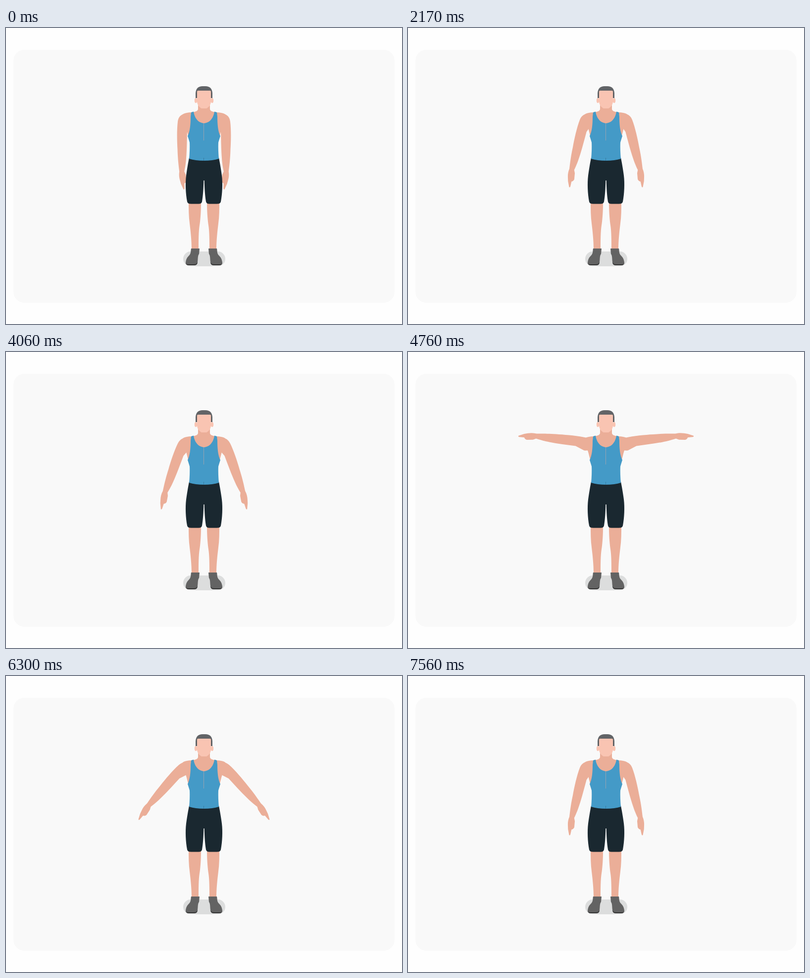
Animation, 800 px wide and 600 px high, one loop 7.63 s. Source, as an HTML page:

```html
<!DOCTYPE html>
<html lang="en">
<head>
<meta charset="utf-8">
<title>Arm raises</title>
<style>
  html, body { margin: 0; width: 100%; height: 100%; overflow: hidden; background: #fefefe; }
  svg { display: block; width: 800px; height: 600px; }
  .skin { fill: #ebae98; }
  .face { fill: #f9c4b2; }
  .hair { fill: #626467; }
  .top { fill: #449ac7; }
  .shorts { fill: #1a2830; }
  .shoe { fill: #636363; }
  .sole { fill: #333; }
</style>
</head>
<body>
<svg viewBox="0 0 800 600">
  <rect x="15" y="44" width="770" height="513" rx="22" fill="#f9f9f9"/>
  <rect x="358" y="453" width="85" height="30" rx="15" fill="#dcdddd"/>

  <!-- left half of the body, mirrored for the right -->
  <g id="half">
    <path id="arm" class="skin" d="M-14 2 C-16 18 -15.5 42 -14.5 58 C-14 78 -12 93 -10.8 103
      C-12 110 -11 116 -9.5 121 L-7.5 128 L-2.5 139 Q-.5 140 -.3 137 L-.5 127
      Q3.5 125 3.8 121 L2 109 L-.8 103 C1.5 92 2.5 84 3 76 C4.5 58 4.5 40 5 22
      L12 4 C12 -8 6 -14 0 -14 C-8 -13 -13 -7 -14 2 Z"/>
    <path class="skin" d="M401 164 H388 C388 169 381 170 374 171 C368 171 362 172 357 175
      L357 189 C364 197 365 208 368 218 L376 228 H401 Z"/>
    <path class="skin" d="M369 352 C369 366 369 382 371 396 C373 413 375 430 375 450 H389
      C389 430 389 413 391 400 C393 387 394 370 394 352 Z"/>
    <path class="sole" d="M363 475 Q363 481 369 481 H381 Q387 481 387 474 Z"/>
    <path class="shoe" d="M374 447 H391 L390 458 C387 462 388 468 387 474 Q386 479 379 479 H368
      Q363 479 363 475 C364 468 366 465 370 461 C374 457 373 452 374 447 Z"/>
    <path class="shorts" d="M370 263 H400.5 V309 H399.3 C399 325 398 340 396 352 Q395 356.5 389 356.5
      H374 Q367 356.5 366 352 C363 336 362 315 364 299 C366 284 368 273 370 263 Z"/>
    <path class="top" d="M374 171 L379 169.500 C381 184 390 193 400.500 193 V269 Q382 269 370 265
      C371 254 371.500 243 371 232 Q369 225 367 219 C372 209 373 194 373 180 Z"/>
  </g>
  <use href="#half" transform="translate(800) scale(-1 1)"/>

  <path class="skin" d="M388 155 H412 V168 H388 Z"/>
  <ellipse class="face" cx="383.500" cy="147" rx="2.700" ry="5"/>
  <ellipse class="face" cx="416.500" cy="147" rx="2.700" ry="5"/>
  <path class="hair" d="M383 142 V132 Q384 118 397 118 H403 Q416 118 417 132 V142 Z"/>
  <path class="face" d="M386 129 Q386 127 388 127 H412 Q414 127 414 129 V150
    C413 157 409 161 405 163 H395 C391 161 387 157 386 150 Z"/>
</svg>
<script>
  const STEP = 70, COUNT = 109, CYCLE = 30, MOVE = 10, RAISED = 96.5;
  const arm = document.getElementById('arm');

  const ease = x => Math.sin(Math.PI / 2 * Math.min(1, x)) ** 1.05;

  // Raise and hold, then lower and hold.
  function lift(step) {
    const phase = step % CYCLE, half = CYCLE / 2;
    const moved = ease(phase % half / MOVE);
    return phase < half ? moved : 1 - moved;
  }

  function draw(now) {
    const i = Math.floor(Math.max(0, now) / STEP) % COUNT;
    const step = Math.min(i, COUNT - i); // plays forward, then back
    arm.setAttribute('transform', `translate(361 188) rotate(${(RAISED * lift(step)).toFixed(2)})`);
    requestAnimationFrame(draw);
  }
  draw(0);
</script>
</body>
</html>
```
